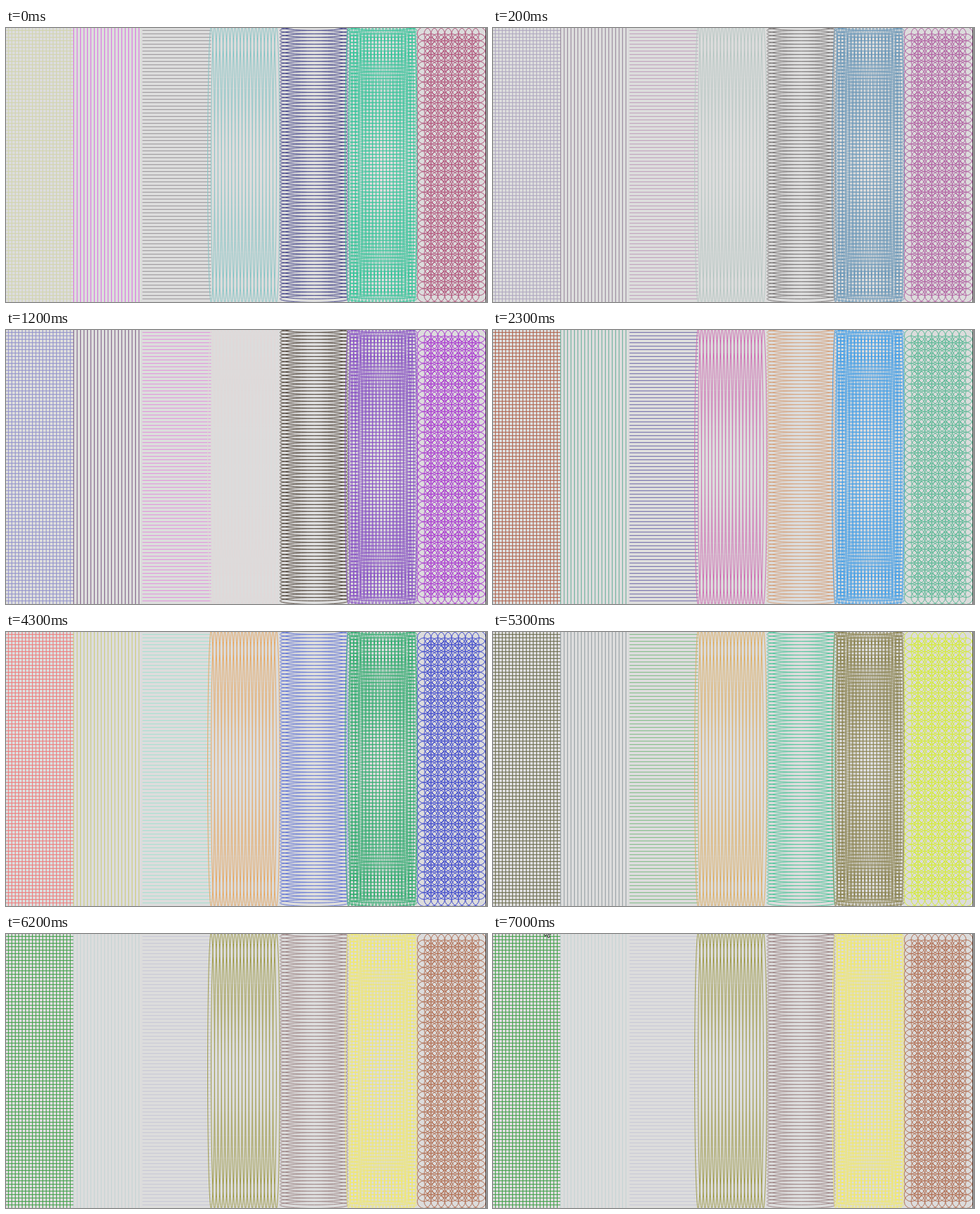
Animation of 700 by 398 pixels, one loop 7.1 s. Source, as an HTML page with a canvas:

```html
<!DOCTYPE html>
<html>
<head>
<meta charset="utf-8">
<style>
html, body { margin: 0; width: 100%; height: 100%; overflow: hidden; background: #dcdcdc; }
canvas { display: block; }
</style>
</head>
<body>
<canvas id="stage" width="700" height="398"></canvas>
<script>
const ctx = document.getElementById('stage').getContext('2d');
const LOOP = 7100, STEP = 5, BAND = 100, HEIGHT = 400;

// Start time, then one colour for each of the seven bands.
const scenes = [
  [0, '#d2d4ae', '#dc70e2', '#9c989c', '#8ac6c6', '#4a4a8c', '#38c49a', '#b05078'],
  [200, '#b0a8c0', '#98889c', '#c0a0bc', '#b8c8c4', '#7c7878', '#6c98b8', '#b05ca0'],
  [1200, '#9494cc', '#806088', '#e294dc', '#e2d8d8', '#54483e', '#8a54c4', '#a832d0'],
  [2300, '#b0644e', '#6cb09c', '#7670ac', '#d070b4', '#d6a27c', '#48a0e6', '#58b894'],
  [3300, '#92f044', '#bcb6bc', '#80ba92', '#3c98bc', '#c4a45c', '#b46a3c', '#e84464'],
  [4300, '#ee7c7c', '#cccc78', '#a6e0d0', '#e6aa66', '#6678d6', '#32ac70', '#3a44cc'],
  [5300, '#6c6c4e', '#96a0a4', '#82bc88', '#deb066', '#52c69c', '#8c8452', '#d4ec30'],
  [6200, '#42a04a', '#c4d4d4', '#c8c8d6', '#a09c4c', '#a08888', '#f0e872', '#b06c50']
];

function line(x1, y1, x2, y2) {
  ctx.beginPath();
  ctx.moveTo(x1, y1);
  ctx.lineTo(x2, y2);
  ctx.stroke();
}

function ellipse(x, y, rx, ry) {
  ctx.beginPath();
  ctx.ellipse(x, y, rx, ry, 0, 0, 2 * Math.PI);
  ctx.stroke();
}

function verticals(left) {
  for (let x = 0; x < BAND; x += STEP) line(left + x, 0, left + x, HEIGHT);
}

function horizontals(left) {
  for (let y = 0; y < HEIGHT; y += STEP) line(left, y, left + BAND, y);
}

function tallEllipses(left) {
  for (let x = 0; x < BAND; x += STEP) ellipse(left + x, HEIGHT / 2, STEP, HEIGHT / 2);
}

function wideEllipses(left) {
  for (let y = 0; y < HEIGHT; y += STEP) ellipse(left + BAND / 2, y, BAND / 2, STEP);
}

function circles(left) {
  for (let x = 10; x < BAND; x += 10) {
    for (let y = 10; y < HEIGHT; y += 10) {
      ellipse(left + x, y, 10, 10);
      if (x % 20 === 0 && y % 20 === 0) ellipse(left + x, y, 5, 5);
    }
  }
}

const bands = [
  [verticals, horizontals],
  [verticals],
  [horizontals],
  [tallEllipses],
  [wideEllipses],
  [tallEllipses, wideEllipses],
  [circles]
];

function pointer(x, y) {
  ctx.save();
  ctx.translate(x, y);
  ctx.beginPath();
  [[0, 0], [0, 13], [3, 10], [5, 15], [7, 14], [5, 9.5], [9, 9.5]].forEach(p => ctx.lineTo(...p));
  ctx.closePath();
  ctx.fillStyle = '#fff';
  ctx.fill();
  ctx.strokeStyle = '#222';
  ctx.stroke();
  ctx.restore();
}

function draw(time) {
  const [, ...colors] = scenes.filter(scene => scene[0] <= time).pop();
  ctx.fillStyle = '#dcdcdc';
  ctx.fillRect(0, 0, 700, 398);
  ctx.lineWidth = 1;
  ctx.save();
  ctx.translate(-1.5, -1.5);
  bands.forEach((patterns, i) => {
    ctx.strokeStyle = colors[i];
    patterns.forEach(pattern => pattern(i * BAND));
  });
  ctx.strokeStyle = '#222';
  line(700, 0, 700, HEIGHT);
  ctx.restore();
  if (time >= 7000) pointer(75.5, -9.5);
  else if (time >= 6900) pointer(67.5, -11.5);
}

const start = performance.now();
function tick() {
  draw((performance.now() - start) % LOOP);
  requestAnimationFrame(tick);
}
tick();
</script>
</body>
</html>
```
